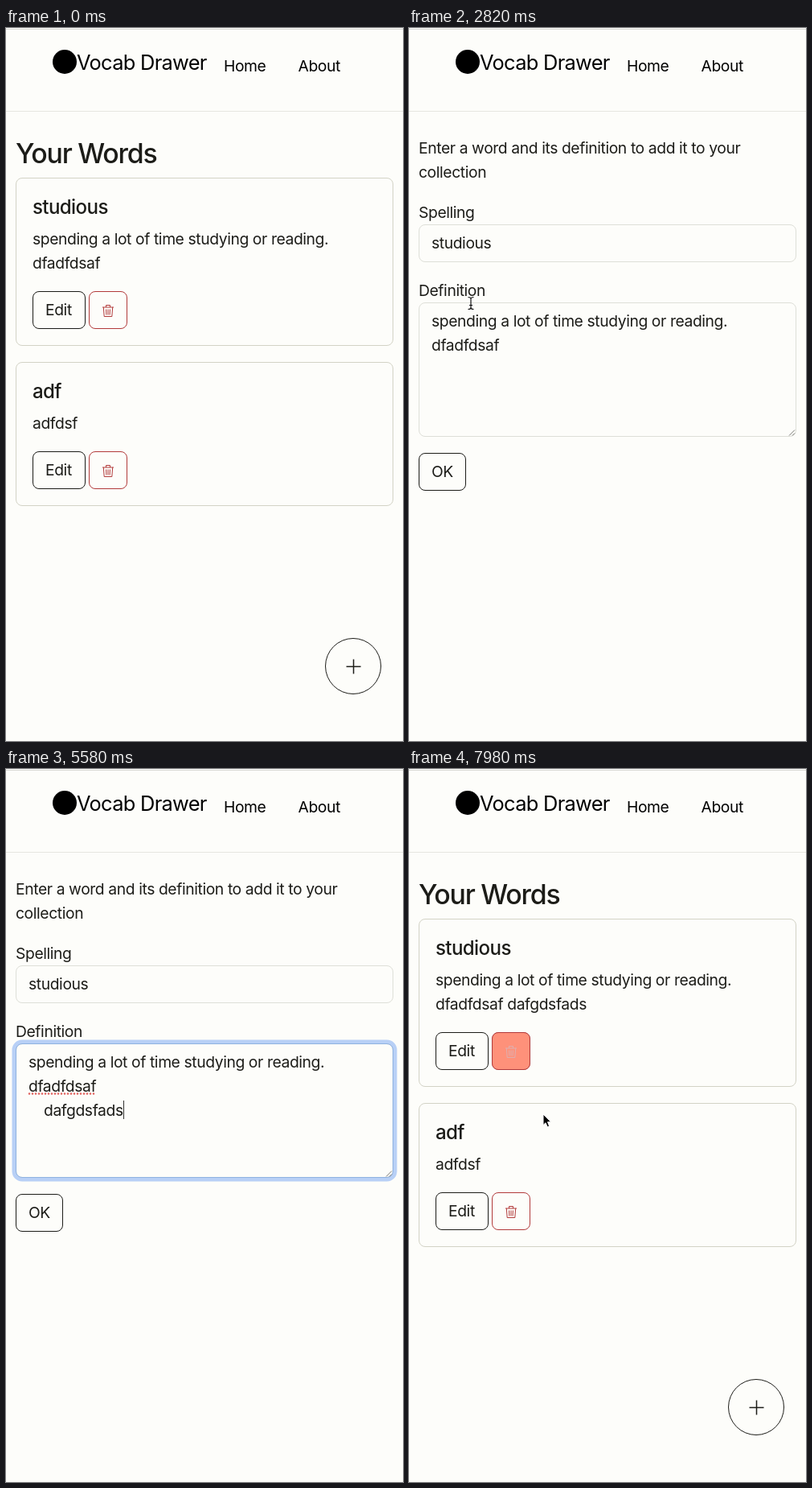
Recreate the animation shown at these times as an HTML page. Size 494x886 px, loop 8000 ms.

```html
<!DOCTYPE html>
<html lang="en">
<head>
<meta charset="utf-8">
<title>Vocab Drawer</title>
<style>
  html, body { margin: 0; width: 100%; height: 100%; overflow: hidden; background: #fdfdfa; }
  svg { display: block; width: 494px; height: 886px; }
  text { font: 19.3px Inter, "Open Sans", sans-serif; letter-spacing: -.0205em; fill: #1c1c18; white-space: pre; }
  .brand { font-size: 25.4px; letter-spacing: -.027em; fill: #000; }
  .nav { fill: #000; }
  .h1 { font-size: 33.8px; font-weight: 500; letter-spacing: -.036em; }
  .h2 { font-size: 24.1px; font-weight: 500; letter-spacing: -.0255em; }
  .status { font-size: 12px; letter-spacing: 0; fill: #444440; }
  .box { fill: none; stroke: #d3d3c6; }
  .field { fill: none; stroke: #dedfd8; }
  .dark { fill: none; stroke: #1c1c18; }
  .red { fill: none; stroke: #b23a3a; }
  .hover text { fill: #fdfdfa; }
  .hover .dark { fill: #1c1c18; }
  .hover .redButton { fill: #ff4824; stroke: #b23a3a; }
  .hover .redIcon { stroke: #fff; }
</style>
</head>
<body>
<svg viewBox="0 0 494 886">
  <defs>
    <g id="trashIcon" fill="none">
      <path d="M120 347h14M124.5 347v-2.5h5v2.5M121.3 347l.9 11.5h9.6l.9-11.5M124.6 349.5l.3 7M127 349.5v7M129.4 349.5l-.3 7"/>
    </g>
    <g id="editButton">
      <rect class="dark" x="33.5" y="327.5" width="65" height="46" rx="7.5"/>
      <text x="49" y="357">Edit</text>
    </g>
    <g id="trashButton">
      <rect class="red" x="103.5" y="327.5" width="47" height="46" rx="7.5"/>
      <use href="#trashIcon" stroke="#b23a3a"/>
    </g>
  </defs>

  <path d="M0 1.5h494" stroke="#d9d9d4"/>
  <path d="M0 103.5h494" stroke="#e6e6e0"/>
  <circle cx="73" cy="42" r="15"/>
  <text class="brand" x="88" y="52">Vocab Drawer</text>
  <text class="nav" x="271" y="54">Home</text>
  <text class="nav" x="363.5" y="54">About</text>

  <g id="list">
    <text class="h1" x="12" y="168">Your Words</text>
    <rect class="box" x="12.5" y="186.5" width="469" height="208" rx="7.5"/>
    <text class="h2" x="33" y="231">studious</text>
    <text x="33" y="269">spending a lot of time studying or reading.</text>
    <text id="savedLine" x="33" y="299"></text>
    <use href="#editButton"/>
    <use href="#trashButton"/>
    <g id="editHover" class="hover">
      <rect class="dark" x="33.5" y="327.5" width="65" height="46" rx="7.5"/>
      <text x="49" y="357">Edit</text>
    </g>
    <g id="trashHover" class="hover">
      <rect class="redButton" x="103.5" y="327.5" width="47" height="46" rx="7.5"/>
      <use href="#trashIcon" class="redIcon"/>
    </g>

    <rect class="box" x="12.5" y="415.5" width="469" height="178" rx="7.5"/>
    <text class="h2" x="33" y="460">adf</text>
    <text x="33" y="498">adfdsf</text>
    <use href="#editButton" y="199"/>
    <use href="#trashButton" y="199"/>

    <circle class="dark" cx="432" cy="793" r="34.5"/>
    <path class="dark" d="M423.5 793.5h18M432.5 784.5v18" stroke-width="1.5"/>
    <g id="status">
      <path d="M0 877.5h158q4 0 4 4v5H0z" fill="#d8d8cc"/>
      <text class="status" x="12" y="892">onrender.com/…/64eb8…</text>
    </g>
  </g>

  <g id="form">
    <text x="12" y="156">Enter a word and its definition to add it to your</text>
    <text x="12" y="186">collection</text>
    <text x="12" y="236">Spelling</text>
    <rect class="field" x="12.5" y="244.5" width="469" height="46" rx="7.5"/>
    <text x="28" y="274">studious</text>
    <text x="12" y="333">Definition</text>
    <rect class="field" x="12.5" y="341.5" width="469" height="166" rx="7.5"/>
    <g id="focusRing" fill="none">
      <rect x="10" y="339" width="474" height="171" rx="10" stroke="#b8d0f6" stroke-width="5"/>
      <rect x="12.5" y="341.5" width="469" height="166" rx="7.5" stroke="#8fb2e0"/>
    </g>
    <text x="28" y="371">spending a lot of time studying or reading.</text>
    <text x="28" y="401">dfadfdsaf</text>
    <path id="spelling" d="M29 403.5h83" stroke="#e0605c" stroke-width="2.6" stroke-linecap="round" stroke-dasharray="0 4"/>
    <text id="typed" x="47" y="431"></text>
    <path id="caret" d="M.5 412v23" stroke="#333330"/>
    <path d="M473 506.5l7-7M477 506.5l3-3" stroke="#777772"/>
    <rect class="dark" x="12.5" y="528.5" width="58" height="46" rx="7.5"/>
    <text x="28" y="558">OK</text>
    <g id="okHover" class="hover">
      <rect class="dark" x="12.5" y="528.5" width="58" height="46" rx="7.5"/>
      <text x="28" y="558">OK</text>
    </g>
  </g>

  <g id="cursor">
    <path id="arrow" d="M0 0v13.5l3-2.8 2.2 5 2.4-1-2.1-5h4.1z" stroke="#fff"/>
    <path id="hand" d="M-1.2 1.2q1.2-1.4 2.4 0l1.2 4.6q1.6-1 2.4.4 1.6-.9 2.4.6 1.8-.6 2.2 1l.5 3.6-1.2 4.6h-7l-4.6-5.8q-.4-2 1.8-1.4l1.6 1.2z" fill="#fff" stroke="#000"/>
    <path id="beam" d="M-3.5-7.5q3.5 0 3.5 2v11q0 2-3.5 2M3.5-7.5q-3.5 0-3.5 2v11q0 2 3.5 2M-2 2.5h4" fill="none" stroke="#111" stroke-width="1.2"/>
  </g>
</svg>
<script>
const LOOP = 8000, OPEN_FORM = 2600, SAVE = 6500, FOCUS = 3700, BLUR = 5900;
const TYPE_START = 4250, KEY_GAP = 125, ADDED = 'dafgdsfads', FADE = 150;

// time, x, y of the pointer's hot spot
const path = [
  [1660, 230, 520], [1950, 87, 366], [2560, 87, 366], [2820, 77, 342], [3400, 77, 342],
  [3700, 168, 427], [5950, 168, 427], [6180, 179, 435], [6340, 50, 552], [6430, 50, 552],
  [6620, 150, 480], [7540, 150, 480], [7720, 127, 354], [7890, 127, 354], [7980, 167, 429]
];
const shapes = [
  [0, ''], [1660, 'arrow'], [1900, 'hand'], [2600, 'beam'], [4200, ''], [5950, 'beam'],
  [6310, 'hand'], [6450, 'arrow'], [7690, 'hand'], [7920, 'arrow']
];

const el = id => document.getElementById(id);
const clamp = v => Math.max(0, Math.min(1, v));
const fade = (t, on, off) => clamp((t - on) / FADE) - clamp((t - off) / FADE);
const show = (id, visible) => el(id).style.display = visible ? '' : 'none';
const opacity = (id, value) => el(id).setAttribute('opacity', value);

function pointerAt(t) {
  const next = path.findIndex(p => p[0] > t);
  if (next < 1) return (next < 0 ? path[path.length - 1] : path[0]).slice(1);
  const [t0, x0, y0] = path[next - 1], [t1, x1, y1] = path[next];
  const u = (t - t0) / (t1 - t0), k = u * u * (3 - 2 * u);
  return [x0 + (x1 - x0) * k, y0 + (y1 - y0) * k];
}

function draw() {
  const t = performance.now() % LOOP;
  const editing = t >= OPEN_FORM && t < SAVE;
  show('list', !editing);
  show('form', editing);

  el('savedLine').textContent = 'dfadfdsaf' + (t >= SAVE ? ' ' + ADDED : '');
  opacity('editHover', fade(t, 1900, OPEN_FORM));
  opacity('trashHover', fade(t, 7690, 7920));
  opacity('okHover', fade(t, 6310, 6450));
  show('status', t >= 1960 && t < OPEN_FORM);

  const keys = Math.max(0, Math.floor((t - TYPE_START) / KEY_GAP) + 1);
  const typed = el('typed');
  typed.textContent = ADDED.slice(0, keys);
  opacity('focusRing', fade(t, FOCUS, BLUR));
  show('spelling', t >= FOCUS);
  show('caret', t >= FOCUS && t < BLUR);
  if (editing) {
    const x = 47 + Math.round(typed.getComputedTextLength());
    el('caret').setAttribute('transform', `translate(${x} 0)`);
  }

  const shape = shapes.filter(s => s[0] <= t).pop()[1];
  for (const id of ['arrow', 'hand', 'beam']) show(id, id === shape);
  el('cursor').setAttribute('transform', `translate(${pointerAt(t)})`);
  requestAnimationFrame(draw);
}
draw();
</script>
</body>
</html>
```
